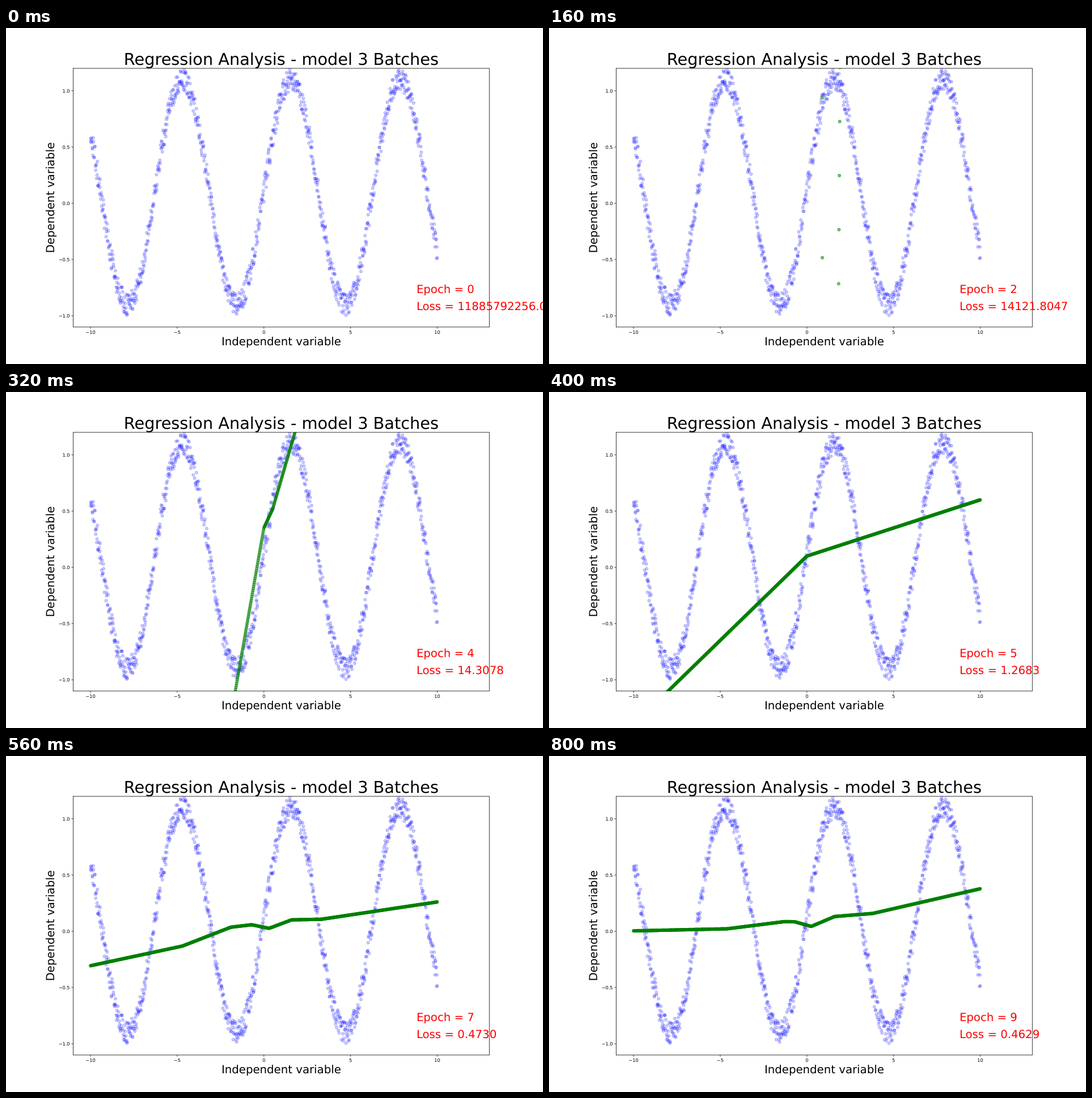
An HTML page with a canvas for the animation above (960 ms loop, 947 by 592 pixels).

```html
<!DOCTYPE html>
<html lang="en">
<head>
<meta charset="utf-8">
<title>Regression Analysis</title>
<style>
  html, body { margin: 0; width: 100%; height: 100%; overflow: hidden; background: #fff; }
  canvas, svg { position: absolute; left: 0; top: 0; width: 947px; height: 592px; }
  text { font-family: "DejaVu Sans", Verdana, sans-serif; font-size: 19.73px; text-rendering: geometricPrecision; }
  .mid { text-anchor: middle; }
  .title { font-size: 28.77px; }
  .tick { font-size: 8.22px; }
  .end { text-anchor: end; }
  .note { fill: #f00; }
  .axes { fill: none; stroke: #000; stroke-width: .8; }
</style>
</head>
<body>
<canvas id="plot" width="947" height="592"></canvas>
<svg viewBox="0 0 947 592">
  <rect class="axes" x="118.4" y="71.04" width="733.9" height="455.84"/>
  <g id="ticks"></g>
  <text class="mid title" x="485.4" y="64.7">Regression Analysis - model 3 Batches</text>
  <text class="mid" x="485.4" y="559.3">Independent variable</text>
  <text class="mid" transform="translate(85.2 299) rotate(-90)">Dependent variable</text>
  <text class="note" id="epoch" x="723.9" y="466.9"></text>
  <text class="note" id="loss" x="723.9" y="497.2"></text>
</svg>
<script>
const LEFT = 118.4, TOP = 71.04, WIDTH = 733.9, HEIGHT = 455.84;
const N = 1000, STEP = 80;
const px = x => LEFT + (x + 11) / 24 * WIDTH;
const py = y => TOP + (1.2 - y) / 2.3 * HEIGHT;
const xAt = i => -10 + 20 * i / (N - 1);

// ReLU fit: value and slope at x = -10, then bends as [x, change of slope].
const relu = (y, slope, ...bends) => x =>
  bends.reduce((sum, [k, d]) => sum + d * Math.max(0, x - k), y + slope * (x + 10));

const epochs = [
  { loss: "11885792256.0000" },
  { loss: "9418362.0000" },
  { loss: "14121.8047", fit: relu(774.948, -71.2, [1.13053, 95.2]) },
  { loss: "448.6132", fit: relu(-40, 4, [0, -1]) },
  { loss: "14.3078", fit: relu(-8.45, .88, [0, -.55], [.5, .2]) },
  { loss: "1.2683", fit: relu(-1.4, .15, [0, -.1]) },
  { loss: "0.6565", fit: relu(-.916, .0905, [-3.8, .032], [-1.05, -.1025], [0, -.022], [1.6, -.0365]) },
  { loss: "0.4730", fit: relu(-.306, .033, [-4.7, .027], [-1.9, -.042], [-.7, -.05], [.3, .09], [1.6, -.055], [3.3, .02]), hold: 2 },
  { loss: "0.5028", fit: relu(.065, -.006, [-4.2, .016], [-.2, .077], [1.5, -.0205]) },
  { loss: "0.4629", fit: relu(.004, .0034, [-4.6, .016], [-1.3, -.022], [-.7, -.041], [.25, .109], [1.6, -.053], [3.8, .023]), hold: 2 }
];
const slots = epochs.flatMap(({ hold = 1 }, n) => Array(hold).fill(n));

const $ = id => document.getElementById(id);
const ctx = $("plot").getContext("2d");
ctx.lineWidth = 1.2;
ctx.beginPath();
ctx.rect(LEFT, TOP, WIDTH, HEIGHT);
ctx.clip();

function random(seed) {
  return () => (seed = (seed * 16807) % 2147483647) / 2147483647;
}

function scatter(f, color) {
  ctx.fillStyle = ctx.strokeStyle = color;
  for (let i = 0; i < N; i++) {
    const x = xAt(i), y = f(x);
    if (y < -1.2 || y > 1.3) continue;
    ctx.beginPath();
    ctx.arc(px(x), py(y), 2.47, 0, 2 * Math.PI);
    ctx.fill();
    ctx.stroke();
  }
}

function draw(n) {
  const { loss, fit } = epochs[n];
  const rnd = random(2024);
  ctx.clearRect(0, 0, 947, 592);
  scatter(x => Math.sin(x) + .2 * rnd(), "rgba(0,0,255,.2)");
  if (fit) scatter(fit, "rgba(0,128,0,.5)");
  $("epoch").textContent = `Epoch = ${n}`;
  $("loss").textContent = `Loss = ${loss}`;
}

function buildTicks() {
  const minus = s => String(s).replace("-", "\u2212");
  let out = "";
  for (let x = -10; x <= 10; x += 5) {
    const p = px(x);
    out += `<path class="axes" d="M${p} 526.9v2.9"/><text class="tick mid" x="${p}" y="539.2">${minus(x)}</text>`;
  }
  for (let y = -1; y <= 1; y += .5) {
    const p = py(y);
    out += `<path class="axes" d="M118.4 ${p}h-2.9"/><text class="tick end" x="112.6" y="${p + 3}">${minus(y.toFixed(1))}</text>`;
  }
  $("ticks").innerHTML = out;
}

let shown = -1;
function frame() {
  const n = slots[Math.floor(performance.now() / STEP) % slots.length];
  if (n !== shown) draw(shown = n);
  requestAnimationFrame(frame);
}

buildTicks();
frame();
</script>
</body>
</html>
```
